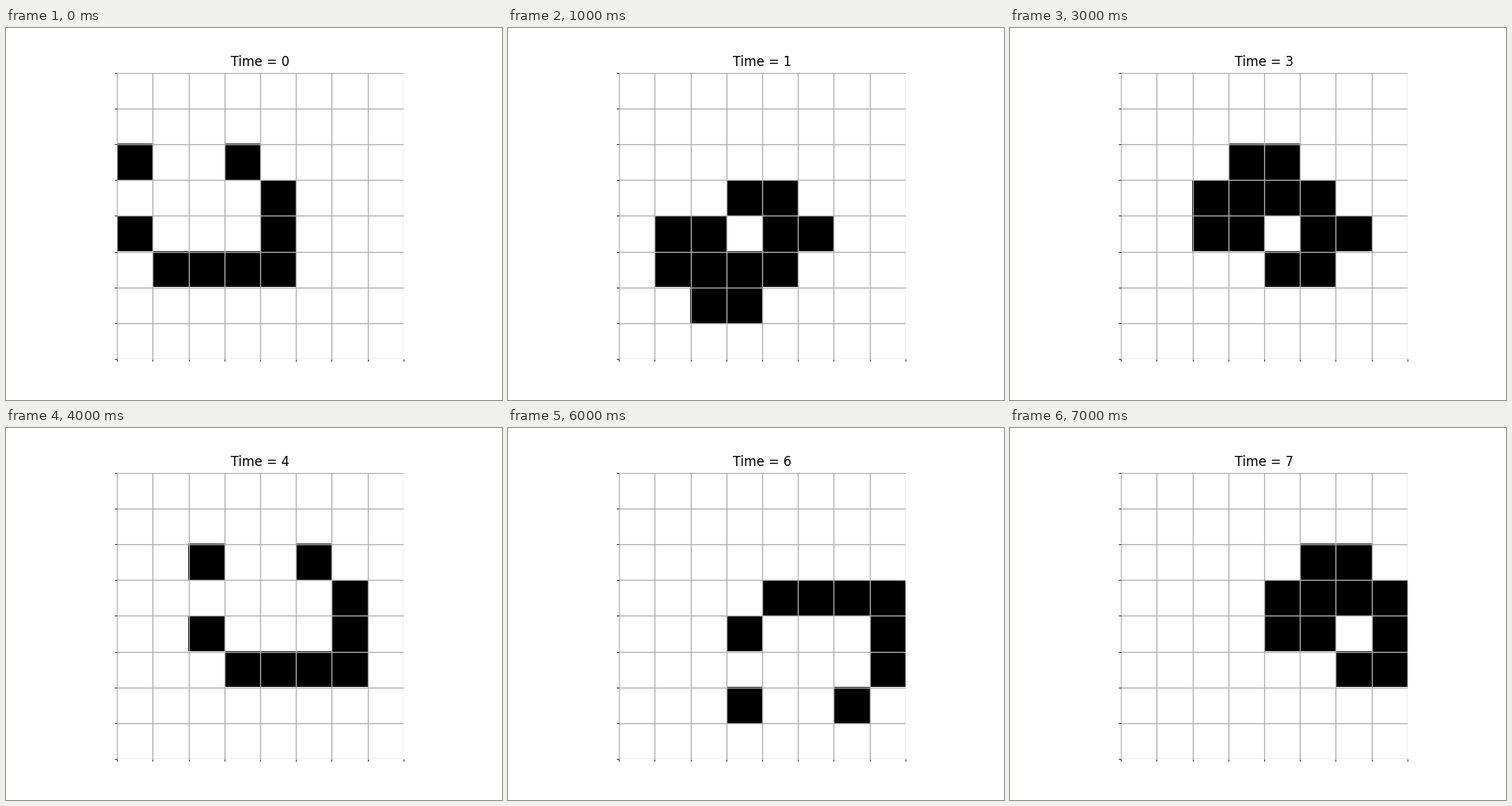
These frames come from a looping animation (640 by 480 pixels, 8000 ms). A matplotlib script:

```python
import numpy as np
import matplotlib.pyplot as plt
from matplotlib.animation import FuncAnimation

SIZE = 8
STEPS = 8
START = ["........",
         "........",
         "X..X....",
         "....X...",
         "X...X...",
         ".XXXX...",
         "........",
         "........"]


def evolve(cells):
    """One Game of Life step on a board with dead borders."""
    pad = np.pad(cells, 1)
    near = sum(pad[r:r + SIZE, c:c + SIZE]
               for r in range(3) for c in range(3)) - cells
    return ((near == 3) | ((cells == 1) & (near == 2))).astype(int)


boards = [np.array([[int(ch == "X") for ch in row] for row in START])]
while len(boards) < STEPS:
    boards.append(evolve(boards[-1]))

fig, ax = plt.subplots(figsize=(6.4, 4.8), dpi=100)
image = ax.imshow(boards[0], cmap="binary", vmin=0, vmax=1)
title = ax.set_title("Time = 0")

# Cell borders are minor ticks, major ticks are hidden
edges = np.arange(SIZE + 1) - 0.5
ax.set_xticks([])
ax.set_yticks([])
ax.set_xticks(edges, minor=True)
ax.set_yticks(edges, minor=True)
ax.grid(which="minor", color="#b0b0b0", linewidth=1)
ax.spines[:].set_visible(False)


def update(step):
    image.set_data(boards[step])
    title.set_text(f"Time = {step}")
    return image, title


anim = FuncAnimation(fig, update, frames=STEPS, interval=1000,
                     repeat=True, repeat_delay=0)
plt.show()
```
